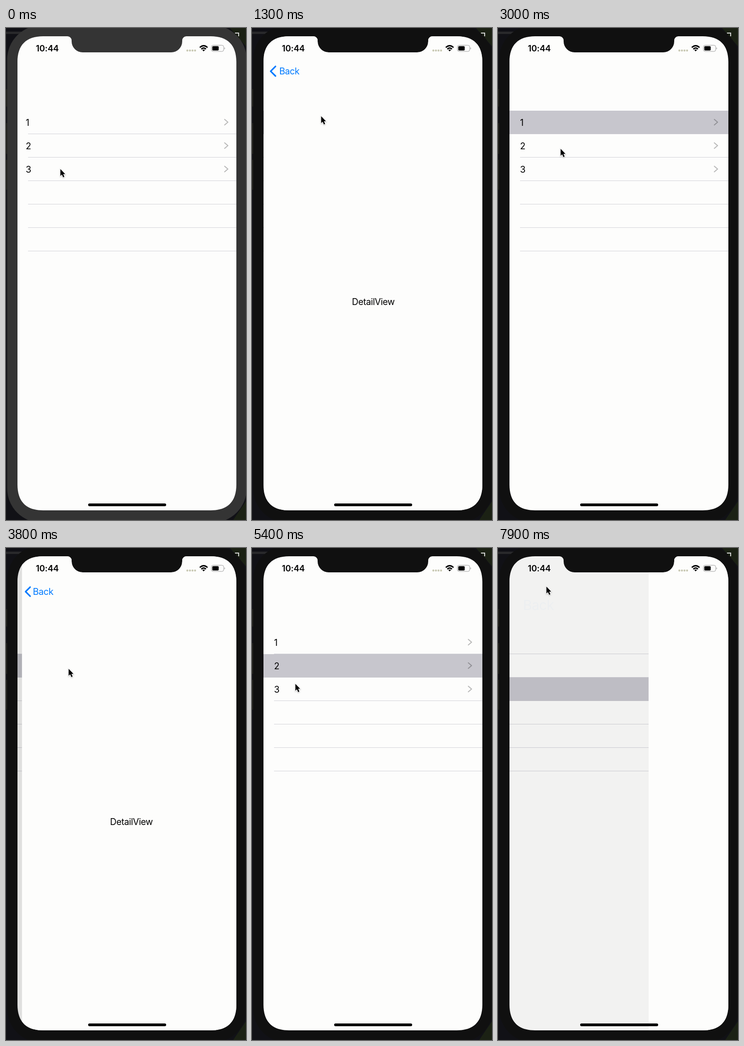
Recreate the animation shown at these times as an HTML page. Size 523 by 1071 pixels, loop 8 s.

```html
<!DOCTYPE html>
<html lang="en">
<head>
<meta charset="utf-8">
<title>Navigation list</title>
<style>
  html, body { margin: 0; width: 100%; height: 100%; overflow: hidden; background: #111114; }
  svg { display: block; width: 523px; height: 1071px; }
  text { font: 400 19.5px Inter, "Liberation Sans", sans-serif; letter-spacing: -.45px; }
  .clock { font-weight: 600; font-size: 18.5px; letter-spacing: -.1px; }
  .line { fill: none; stroke-linecap: round; stroke-linejoin: round; }
  .page { fill: #fdfdfc; }
  #cursor { filter: drop-shadow(0 1px 1px #0004); }
</style>
</head>
<body>
<svg viewBox="0 0 523 1071">
  <defs>
    <clipPath id="screen">
      <path d="M81 18H134A9 9 0 0 1 143 27V29A24 24 0 0 0 167 53H360A24 24 0 0 0 384 29V27A9 9 0 0 1 393 18H446C483 18 502 37 502 74V994C502 1031 483 1050 446 1050H81C44 1050 25 1031 25 994V74C25 37 44 18 81 18Z"/>
    </clipPath>
  </defs>

  <rect width="523" height="1071" fill="#111116"/>
  <path d="M0 8H60V13H0Z" fill="#29292b"/>
  <path d="M488 0H523V40ZM523 1030V1071H495Z" fill="#1b2114"/>
  <path d="M499 11H507V18" fill="none" stroke="#d8d8d8" stroke-width="2"/>
  <path d="M0 133H6V171H0ZM0 207H6V274H0ZM0 287H6V352H0Z" fill="#20201c"/>
  <rect id="bezel" x="2.500" y="-6" width="522" height="1083" rx="75"/>

  <g clip-path="url(#screen)">
    <rect class="page" x="25" y="18" width="478" height="1033"/>
    <g id="list"></g>
    <rect id="dim" x="25" y="18" width="478" height="1033"/>
    <g id="detail">
      <rect class="page" x="25" y="18" width="478" height="1033"/>
      <text x="263.500" y="603" text-anchor="middle">DetailView</text>
    </g>
    <g id="back">
      <path id="arrow" class="line" d="M12.500 -10.500L2 0L12.500 10.500" stroke="#007aff" stroke-width="3.400"/>
      <text id="label" y="7" fill="#007aff">Back</text>
    </g>
  </g>

  <text class="clock" x="65" y="51">10:44</text>
  <path class="line" d="M395.200 49H412.500" stroke="#c9c9b4" stroke-width="4.400" stroke-dasharray="0 5.600"/>
  <g fill="none" stroke="#000" stroke-width="2.800">
    <path d="M422.300 42.500Q430.700 34.500 439.100 42.500M425.600 46Q430.700 41 435.800 46"/>
    <path d="M427.800 47.800Q430.700 45.500 433.600 47.800L430.700 51Z" fill="#000" stroke="none"/>
  </g>
  <rect x="447.500" y="37.500" width="27" height="13.500" rx="4" fill="none" stroke="#9a9a9a"/>
  <rect x="449.500" y="39.500" width="14" height="9.500" rx="2"/>
  <path d="M476 42Q478.500 44.250 476 46.500Z" fill="#9a9a9a"/>
  <rect x="179" y="1035" width="170" height="6" rx="3"/>
  <path id="cursor" d="M.5 1V16L3.900 12.900L6.500 19L9.200 17.800L6.600 11.900H11Z"
    stroke="#fff" stroke-width="2" paint-order="stroke"/>
</svg>

<script>
const LOOP = 8000, STEP = 100, WIDTH = 477, RATE = 20;
const TOP = 180, ROW = 51;
const $ = id => document.getElementById(id);
const list = $('list');

function add(tag, attrs, text = '') {
  const el = document.createElementNS('http://www.w3.org/2000/svg', tag);
  set(el, attrs);
  el.textContent = text;
  return list.appendChild(el);
}
function set(el, attrs) {
  for (const key in attrs) el.setAttribute(key, attrs[key]);
}
const move = (el, x, y = 0, scale = 1) =>
  set(el, { transform: `translate(${x} ${y}) scale(${scale})` });

for (let i = 1; i <= 6; i++)
  add('rect', { x: 48, y: TOP + ROW * i - 1, width: 455, height: 1, fill: '#d2d2d8' });
const highlight = add('rect', { x: 25, width: 478, height: ROW, fill: '#c7c6cd' });
const digits = [], chevrons = [];
for (let i = 0; i < 3; i++) {
  const mid = TOP + ROW * i + 25;
  digits.push(add('text', { y: mid + 8 }, i + 1));
  chevrons.push(add('path', {
    class: 'line', stroke: '#000', 'stroke-opacity': 0.27, 'stroke-width': 2.2,
    d: `M0 ${mid - 6}l7 6l-7 6`
  }));
}

// each visit opens a row and returns; spot and exit are the pointer's click points
const REST = [118, 306];
const visits = [
  { tap: 800, push: 869, pop: 2023.5, spot: [156, 202], exit: [92, 81] },
  { tap: 3500, push: 3510, pop: 4720, spot: [136, 262], exit: [95, 84] },
  { tap: 6000, push: 6372.5, pop: 7792, spot: [94, 298], exit: [105, 83] }
];

const clamp = x => Math.min(1, Math.max(0, x));
const easeOut = k => 1 - (1 - k) ** 3;
const smooth = k => k * k * (3 - 2 * k);
const mix = (a, b, k) => a.map((v, i) => v + (b[i] - v) * k);

function pointer(t) {
  let at = REST, leave = 0;
  for (const v of visits) {
    const glide = (from, to) => clamp((t - from) / (to - from));
    at = mix(at, v.spot, easeOut(glide(leave, v.tap - 500)));
    at = mix(at, v.exit, smooth(glide(v.push + 300, v.pop - 150)));
    leave = v.pop + 380;
  }
  return at;
}

// critically damped spring, 1 at rest and settling to 0
function spring(ms) {
  const s = Math.max(0, ms) / 1000 * RATE;
  return s > 12 ? 0 : (1 + s) * Math.exp(-s);
}

function draw(t) {
  const row = visits.filter(v => v.tap <= t).length - 1;
  const visit = visits[row];
  // 0 = detail fully shown, 1 = detail off to the right
  const away = visit ? spring(t - visit.push) + 1 - spring(t - visit.pop) : 1;
  const inset = visit ? 5 : 0;

  set($('bezel'), { fill: visit ? '#101010' : '#343434' });
  move(list, -0.3 * WIDTH * (1 - away));
  move($('detail'), WIDTH * away);
  set($('dim'), { opacity: 0.115 * (1 - away) });

  set(highlight, { y: TOP + ROW * row, visibility: visit ? 'visible' : 'hidden' });
  digits.forEach(d => set(d, { x: 43 + inset }));
  chevrons.forEach(c => move(c, 476.5 - inset));

  // the back label grows and sinks toward the large title while fading
  move($('back'), 0, 94 + 48 * away);
  move($('label'), 59.5 - 5 * (1 - Math.exp(-10 * away)), 0, 1 + 0.85 * away);
  set($('label'), { opacity: clamp(1.1 * (1 - away) ** 4) });
  move($('arrow'), 38.5 + 110 * away, 0, Math.max(0.3, 1 - 2.5 * away));
  set($('arrow'), { opacity: clamp(1.25 - 11 * away) });

  move($('cursor'), ...pointer(t));
}

const start = performance.now();
function tick() {
  const t = (performance.now() - start + 10) % LOOP;
  draw(Math.floor(t / STEP) * STEP);
  requestAnimationFrame(tick);
}
tick();
</script>
</body>
</html>
```
